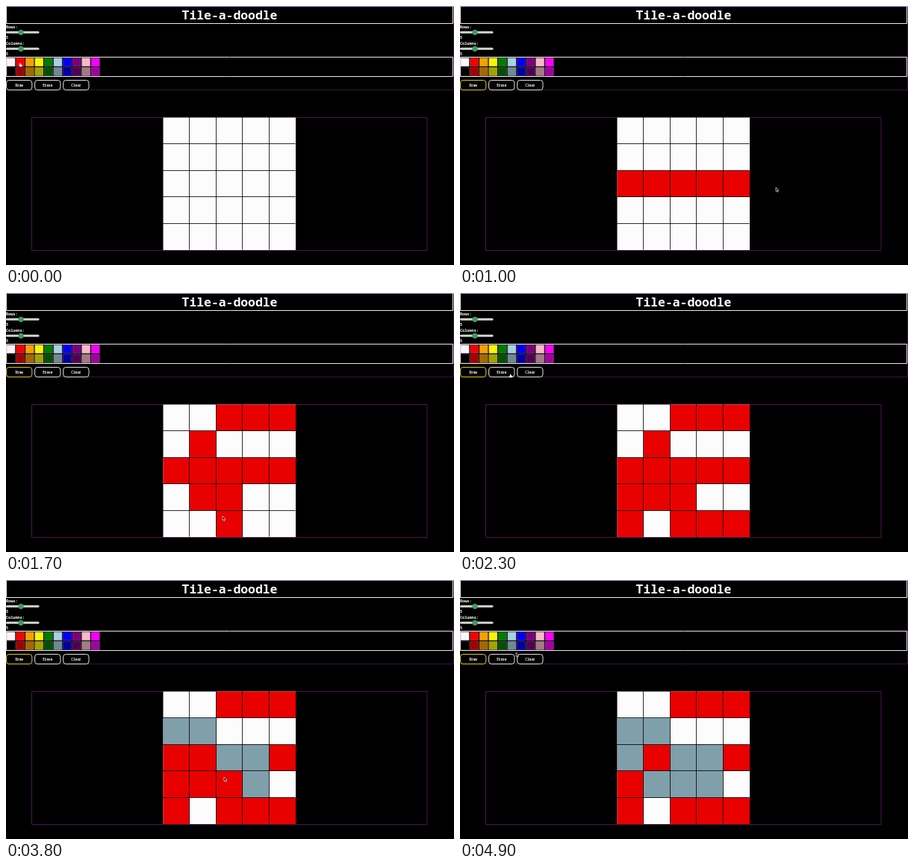
An HTML page with a canvas that plays this animation: 600 px wide and 347 px high, repeating every 5000 ms.

```html
<!DOCTYPE html>
<html lang="en">
<head>
<meta charset="utf-8">
<title>Tile-a-doodle</title>
<style>
  html, body { margin: 0; width: 100%; height: 100%; overflow: hidden; background: #000; }
  canvas { display: block; width: 600px; height: 347px; }
</style>
</head>
<body>
<canvas id="stage" width="600" height="347"></canvas>
<script>
const ctx = document.getElementById('stage').getContext('2d');
const LOOP = 5000, STEP = 100;
const FONT = '"Noto Sans Mono", "DejaVu Sans Mono", monospace';
const RED = '#e90000', SLATE = '#7f9fab';
const GRID = { x: 210, y: 149, cell: 35.5, count: 5 };
const DRAW_CLICK = 600;
const HUES = 'white red orange yellow green lightblue blue purple pink magenta'.split(' ');
const BUTTONS = ['Draw', 'Erase', 'Clear'];
const buttonX = i => 0.5 + i * 38.1;

const move = (t, x, y) => ({ t, x, y });

// The pointer visits cells (column-row pairs) in turn and paints each one
const stroke = (start, delay, color, cells) => cells.split(' ').map(([col, row], i) => ({
  t: start + i * delay,
  x: GRID.x + (+col + 0.5) * GRID.cell,
  y: GRID.y + (+row + 0.5) * GRID.cell,
  col: +col, row: +row, color
}));

const ROUTE = [
  move(0, 18.5, 76),
  move(DRAW_CLICK, 22, 104),
  stroke(850, 30, RED, '02 12 22 32 42'),
  move(1000, 423, 243),
  move(1150, 452, 205),
  stroke(1300, 60, RED, '40 30 20 11 13 23 24'),
  move(1700, 290, 299),
  stroke(1800, 60, RED, '34 44'),
  stroke(2080, 70, RED, '03 04'),
  move(2300, 67, 108),
  move(2800, 69, 87),
  move(3200, 142, 170),
  stroke(3400, 80, SLATE, '01 11 22 32 33'),
  move(3800, 292, 264),
  stroke(3850, 90, SLATE, '23 13 02'),
  move(4900, 75, 97),
  move(LOOP, 75, 97)
].flat();

function pointerAt(t) {
  const i = ROUTE.findIndex(p => p.t > t);
  const a = ROUTE[i - 1], b = ROUTE[i];
  const k = (t - a.t) / (b.t - a.t);
  return [a.x + (b.x - a.x) * k, a.y + (b.y - a.y) * k];
}

function rect(x, y, w, h, color) {
  ctx.fillStyle = color;
  ctx.fillRect(x, y, w, h);
}

function pill(x, y, w, h, radius, color) {
  ctx.beginPath();
  ctx.roundRect(x, y, w, h, radius);
  ctx.fillStyle = color;
  ctx.fill();
}

function frame(x, y, w, h, color, radius = 0) {
  ctx.beginPath();
  ctx.roundRect(x, y, w, h, radius);
  ctx.strokeStyle = color;
  ctx.lineWidth = 1;
  ctx.stroke();
}

function text(str, x, y, size, weight, align = 'left') {
  ctx.font = `${weight} ${size}px ${FONT}`;
  ctx.textAlign = align;
  ctx.fillStyle = '#fff';
  ctx.fillText(str, x, y);
}

function slider(label, y) {
  text(label, 0, y, 5.2, 600);
  pill(0, y + 4.1, 44.5, 3, 1.5, '#d2d4d2');
  pill(16.4, y + 2, 7.2, 7.2, 3.6, '#3f9a62');
  text('5', 0, y + 14.7, 5.2, 600);
}

function swatches(colors, y, shade) {
  colors.forEach((color, i) => {
    const x = 1 + i * 12.57;
    rect(x, y, 11.2, 11.2, color);
    rect(x, y, 11.2, 11.2, `rgba(0,0,0,${shade})`);
    frame(x, y, 11.2, 11.2, 'rgba(150,130,160,.3)');
  });
}

function page(t) {
  rect(0, 0, 600, 347, '#000');
  frame(-0.5, -0.5, 600, 113, '#3a123f');
  frame(0.5, 0.5, 598, 23, '#efe9dc');
  rect(0, 0, 600, 1, '#aaa0e6');
  text('Tile-a-doodle', 299.5, 18.1, 16.4, 700, 'center');
  slider('Rows:', 29.7);
  slider('Columns:', 51.7);
  frame(0.5, 68.5, 598, 26, '#eadfea');
  swatches(HUES, 69.6, 0.03);
  swatches(['black', ...HUES.slice(1)], 82.2, 0.36);
  BUTTONS.forEach((label, i) => {
    const active = i === 0 && t >= DRAW_CLICK;
    frame(buttonX(i), 99.5, 34.3, 13, active ? '#d8cc1c' : '#e2e2e2', 3.5);
    text(label, buttonX(i) + 17.2, 107.7, 4.4, 700, 'center');
  });
  frame(34.5, 149.5, 529.5, 178, '#4d1450');
}

function board(t) {
  const { x, y, cell, count } = GRID, size = cell * count;
  rect(x + 0.5, y + 0.5, size, size, '#fdfcfd');
  for (const { t: at, col, row, color } of ROUTE) {
    if (color && t >= at) rect(x + 0.5 + col * cell, y + 0.5 + row * cell, cell, cell, color);
  }
  for (let i = 1; i < count; i++) {
    const at = Math.floor(i * cell);
    rect(x + at, y, 1, size, 'rgba(0,0,0,.82)');
    rect(x, y + at, size, 1, 'rgba(0,0,0,.82)');
  }
}

function isClickable(x, y) {
  if (y > 69 && y < 94) return x < 126;
  return y > 99 && y < 113 && BUTTONS.some((_, i) => x > buttonX(i) && x < buttonX(i) + 34);
}

function pointer(t) {
  const [x, y] = pointerAt(t);
  ctx.save();
  ctx.translate(x, y);
  if (isClickable(x, y)) {
    rect(0, 0.6, 1.2, 3, '#fff');
    pill(-0.8, 2.6, 4, 2.6, 1, '#fff');
  } else {
    ctx.beginPath();
    ctx.moveTo(0, 0);
    ctx.lineTo(0, 5.4);
    ctx.lineTo(1.3, 4.3);
    ctx.lineTo(2.2, 6.3);
    ctx.lineTo(3.2, 5.9);
    ctx.lineTo(2.4, 4);
    ctx.lineTo(4, 3.9);
    ctx.closePath();
    ctx.fillStyle = '#000';
    ctx.fill();
    ctx.strokeStyle = '#eee';
    ctx.lineWidth = 0.7;
    ctx.stroke();
  }
  ctx.restore();
}

const began = performance.now();
function draw() {
  const t = Math.floor(((performance.now() - began) % LOOP) / STEP) * STEP;
  page(t);
  board(t);
  pointer(t);
  requestAnimationFrame(draw);
}
draw();
</script>
</body>
</html>
```
